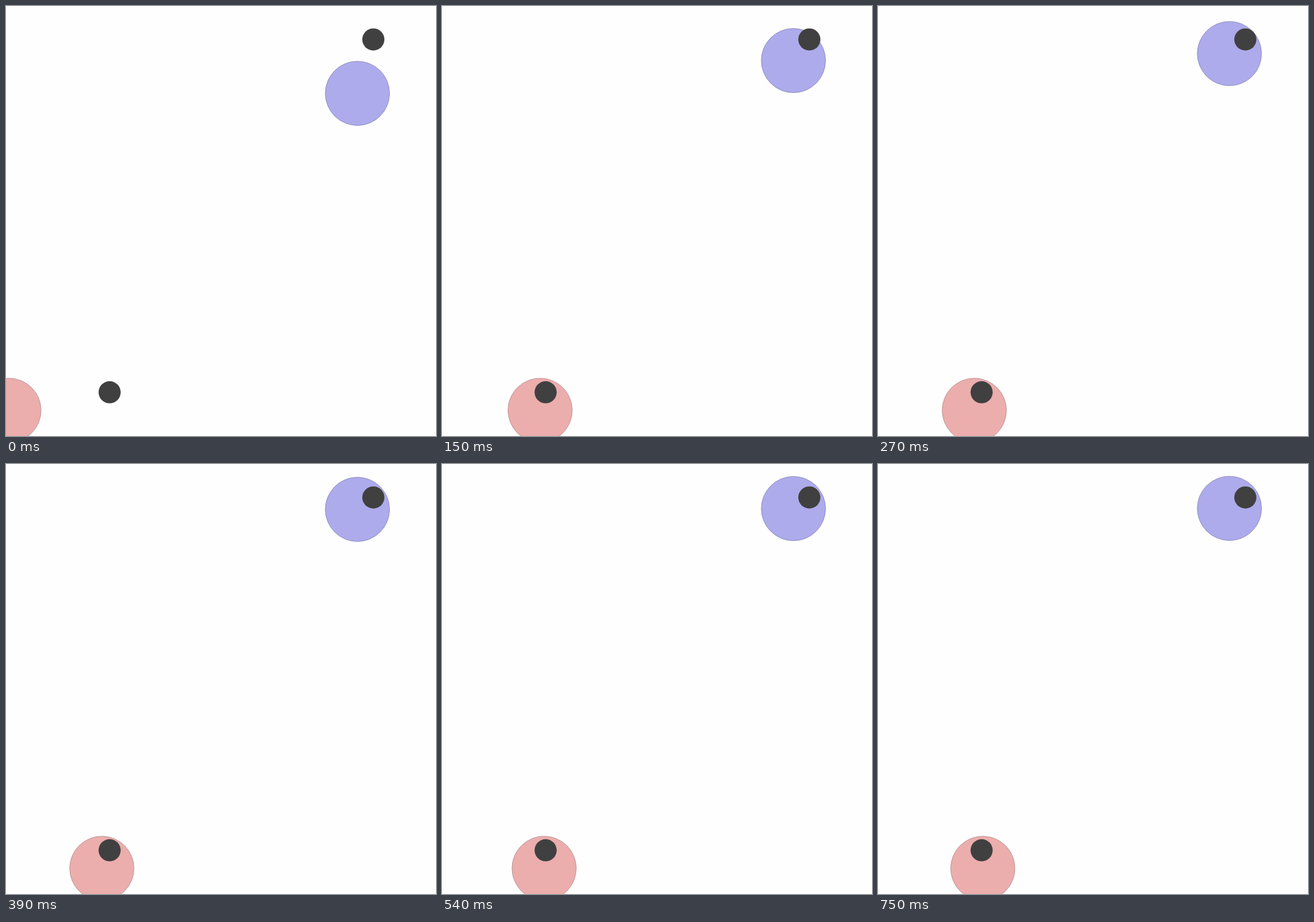
These frames come from a looping animation (700x700 px, 780 ms). An HTML page:

```html
<!DOCTYPE html>
<html lang="en">
<head>
<meta charset="utf-8">
<title>Two easings</title>
<style>
  html, body { margin: 0; height: 100%; overflow: hidden; background: #fefefe; }
  svg { display: block; width: 100vw; height: 100vh; }
  .ball { stroke-width: .8; }
  #red { fill: #ecadad; stroke: #b08a8a; }
  #blue { fill: #adabeb; stroke: #8583b4; }
  .dot { fill: #404040; }
</style>
</head>
<body>
<svg viewBox="0 0 700 700">
  <circle id="red" class="ball" cx="4.7" cy="658.2" r="52.3"/>
  <circle id="blue" class="ball" cx="572.1" cy="142.2" r="52.3"/>
  <circle class="dot" cx="168.7" cy="628.8" r="18"/>
  <circle class="dot" cx="598" cy="54.4" r="18"/>
</svg>
<script>
  const STEP = 30, LOOP = 780;
  const red = document.getElementById('red');
  const blue = document.getElementById('blue');

  // Entry and rebound of the red ball: [step, x]
  const path = [[0, 4.7], [3, 93.3], [5, 159.7], [6, 182], [7, 178],
                [9, 156.8], [11, 154.7], [13, 156]];
  const REST = 172;

  const slope = i => {
    const a = path[Math.max(i - 1, 0)];
    const b = path[Math.min(i + 1, path.length - 1)];
    return (b[1] - a[1]) / (b[0] - a[0]);
  };

  function redX(n) {
    if (n >= 13) return REST - 16 * 0.815 ** (n - 13);
    const i = path.findIndex((p, k) => n < path[k + 1][0]);
    const [n0, x0] = path[i], [n1, x1] = path[i + 1];
    const d = n1 - n0, u = (n - n0) / d, v = 1 - u;
    return v * v * (1 + 2 * u) * x0 + u * u * (3 - 2 * u) * x1
         + d * u * v * (v * slope(i) - u * slope(i + 1));
  }

  const blueY = n => 72.2 + 70 * 0.75 ** n;

  const start = performance.now();
  function draw() {
    const t = Math.max(0, performance.now() - start) % LOOP;
    const n = Math.floor(t / STEP);
    red.setAttribute('cx', redX(n).toFixed(2));
    blue.setAttribute('cy', blueY(n).toFixed(2));
    requestAnimationFrame(draw);
  }
  draw();
</script>
</body>
</html>
```
